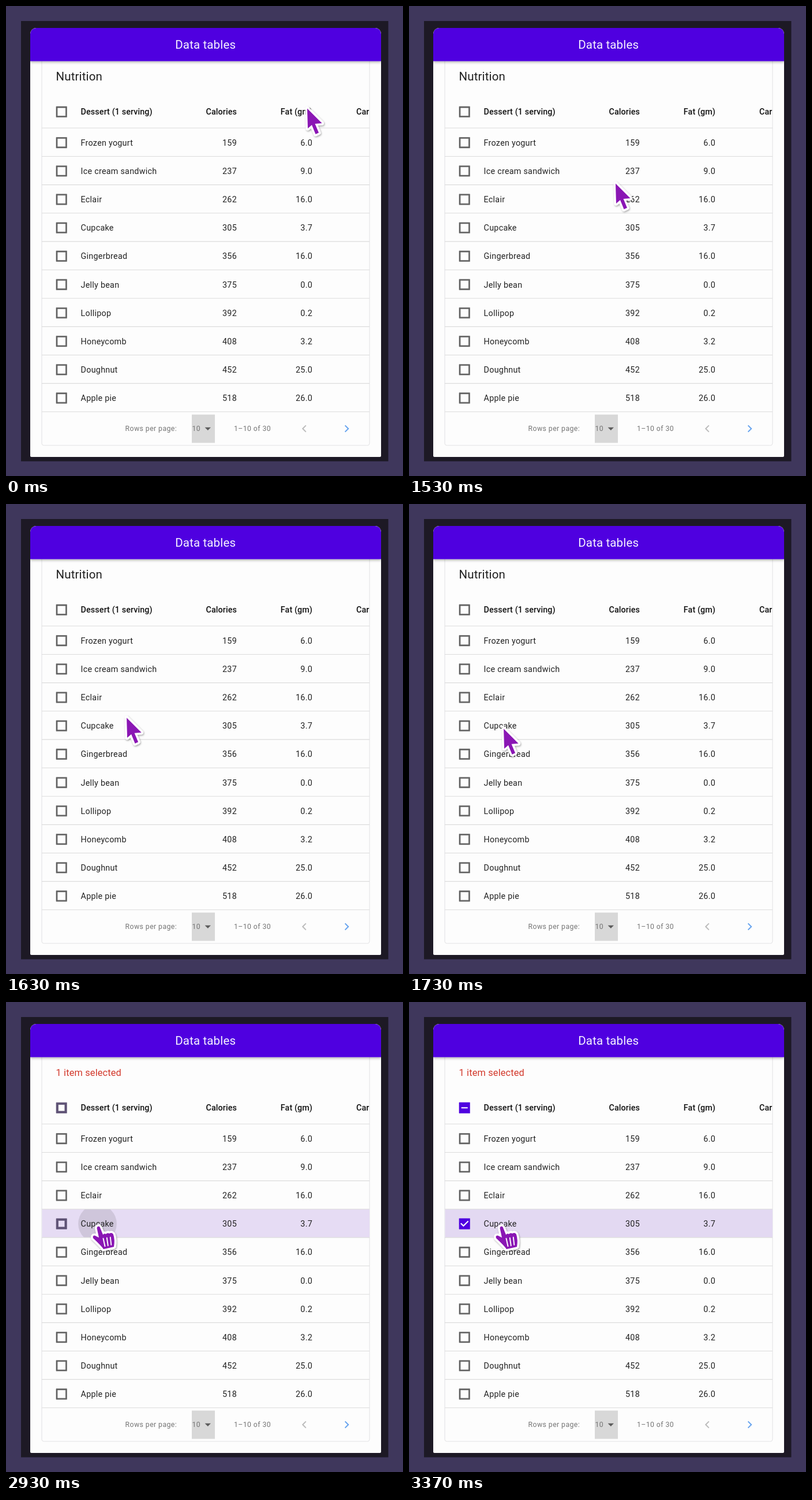
These frames come from a looping animation (688x814 px, 4.13 s). An HTML page:

```html
<!DOCTYPE html>
<html lang="en">
<head>
<meta charset="utf-8">
<title>Data tables</title>
<style>
  html, body { margin: 0; width: 100%; height: 100%; overflow: hidden; background: #3f375c; }
  svg { display: block; width: 688px; height: 814px; font-family: Roboto, sans-serif; }
  .title { font-size: 20.48px; letter-spacing: .15px; }
  .note { font-size: 16.38px; letter-spacing: .15px; fill: #d2382b; }
  .head { font-size: 14.34px; font-weight: 500; letter-spacing: .1px; fill: #111; }
  .cell { font-size: 14.34px; letter-spacing: .256px; fill: #222; }
  .foot { font-size: 12.29px; letter-spacing: .41px; fill: #757575; }
  .end { text-anchor: end; }
  .line { stroke: #dcdcdc; stroke-width: 1.1; }
  .mark { fill: none; stroke: #fff; stroke-width: 2.05; }
  .chevron { fill: none; stroke-width: 2; }
  .pointer { fill: #8a12b4; stroke: #fff; stroke-width: 7; stroke-linejoin: round; paint-order: stroke; filter: url(#shade); }
</style>
</head>
<body>
<svg viewBox="0 0 688 814">
  <defs>
    <filter id="shade" x="-40%" y="-40%" width="180%" height="180%">
      <feDropShadow dx="1" dy="1.5" stdDeviation="1.6" flood-opacity=".38"/>
    </filter>
    <filter id="barShade" x="-5%" y="-20%" width="110%" height="150%">
      <feDropShadow dx="0" dy="2" stdDeviation="2.2" flood-opacity=".3"/>
    </filter>
    <clipPath id="page"><path d="M42 48a10 10 0 0 1 10-10H640a10 10 0 0 1 10 10V779a2 2 0 0 1-2 2H44a2 2 0 0 1-2-2Z"/></clipPath>
    <clipPath id="card"><rect x="62" y="90" width="568" height="671"/></clipPath>
    <clipPath id="row"><rect x="62.5" y="358.9" width="567.5" height="49.1"/></clipPath>
  </defs>
  <rect width="688" height="814" fill="#3f375c"/>
  <rect x="26" y="26" width="636.5" height="762.5" fill="#1d1925"/>
  <g clip-path="url(#page)">
    <rect x="42" y="38" width="608" height="743" fill="#fdfdfd"/>
    <rect x="62" y="80" width="568" height="681" rx="4" fill="#fdfdfd" stroke="#e3e3e5" stroke-width="1.1"/>
    <g clip-path="url(#card)">
      <g id="selection">
        <rect id="tint" x="62.5" y="358.9" width="567.5" height="49.1"/>
        <circle id="splash" cx="158.5" cy="384" clip-path="url(#row)"/>
      </g>
      <g id="table"></g>
    </g>
    <text id="heading" class="title" x="86.5" y="129.3" fill="#212121">Nutrition</text>
    <text id="count" class="note" x="86.5" y="127.7">1 item selected</text>
    <rect x="322" y="707.6" width="40" height="49" fill="#d8d8d8"/>
    <path d="M344.6 729.8h10.4l-5.2 5.2z" fill="#5c5c5c"/>
    <g class="foot">
      <text x="206.6" y="736.3">Rows per page:</text>
      <text x="322.4" y="736.3">10</text>
      <text x="395" y="736.3">1–10 of 30</text>
    </g>
    <path class="chevron" stroke="#bcbcbc" d="M519.8 726.4l-5.6 5.6 5.6 5.6"/>
    <path class="chevron" stroke="#67a3ee" d="M587.6 726.4l5.6 5.6-5.6 5.6"/>
    <path filter="url(#barShade)" fill="#4f00e0" d="M42 95.5V48a10 10 0 0 1 10-10H640a10 10 0 0 1 10 10V95.5Z"/>
    <text class="title" x="345.7" y="74.2" text-anchor="middle" fill="#f6f2ff">Data tables</text>
  </g>
  <path id="arrow" class="pointer" d="M0 0L1 34.5 8 28.5 14.5 44.5 20 42 13.500 26.500 25.500 25.500Z"/>
  <g id="hand">
    <path class="pointer" d="M157.500 391.500Q158.500 387 162.500 389.500L168 403Q170.500 400 173 402Q176 399 179 401Q183.500 398.500 186 402.500Q189 412 187 424L169 428Q165 422 151 409Q149.500 404 154 404.500L161 408Z"/>
    <path d="M168.500 409.500l3 13.500M174.800 408.500l2 13.500M180.800 407.500l1.500 13" fill="none" stroke="#fff" stroke-width="1.9" stroke-linecap="round"/>
  </g>
</svg>
<script>
const LOOP = 4130, MOVE = 46, ARRIVE = 54, CLICK = 88, CHOSEN = 3;
const ROW_TOP = 211.3, ROW_HEIGHT = 49.15;
const BOX_X = 96.2, BOX_SIZE = 18.43, UNIT = 1.024;
const GREY = [97, 97, 97], ACTIVE = [79, 0, 224];
const desserts = [
  ['Frozen yogurt', 159, 6], ['Ice cream sandwich', 237, 9], ['Eclair', 262, 16],
  ['Cupcake', 305, 3.7], ['Gingerbread', 356, 16], ['Jelly bean', 375, 0],
  ['Lollipop', 392, .2], ['Honeycomb', 408, 3.2], ['Doughnut', 452, 25], ['Apple pie', 518, 26]
];
const byId = id => document.getElementById(id);
const table = byId('table');
const clamp = v => Math.min(1, Math.max(0, v));
const mix = (a, b, p) => a + (b - a) * p;
const blend = (a, b, p) => `rgb(${a.map((v, i) => Math.round(mix(v, b[i], p)))})`;
const show = (node, on) => node.setAttribute('visibility', on ? 'visible' : 'hidden');

function add(tag, attrs, text = '') {
  const node = document.createElementNS('http://www.w3.org/2000/svg', tag);
  for (const name in attrs) node.setAttribute(name, attrs[name]);
  node.textContent = text;
  return table.appendChild(node);
}

function addLine(y) {
  add('line', { class: 'line', x1: 62, x2: 630, y1: y, y2: y });
}

function addRow(y, kind, [name, calories, fat, carbs]) {
  const put = (x, text, align = '') => add('text', { class: `${kind} ${align}`, x, y: y + 5.1 }, text);
  put(129.6, name);
  put(400, calories, 'end');
  put(531, fat, 'end');
  if (carbs) put(607, carbs);
  return { y, frame: add('path', { 'fill-rule': 'evenodd' }), mark: add('path', { class: 'mark' }) };
}

function square(y, half) {
  return `M${BOX_X - half} ${y - half}h${2 * half}v${2 * half}h${-2 * half}Z`;
}

// The frame fills inwards during the first half, the mark draws in the second.
function drawBox({ y, frame, mark }, p, dash) {
  const half = BOX_SIZE / 2 - (1 - Math.abs(p - .5) * 2) * UNIT;
  const hole = half - 2 * UNIT - 2 * half * p * 2;
  frame.setAttribute('d', square(y, half) + (hole > 0 ? square(y, hole) : ''));
  const color = blend(GREY, ACTIVE, clamp(p * 4));
  for (const [name, value] of [['fill', color], ['stroke', color], ['stroke-width', .6], ['stroke-linejoin', 'round']])
    frame.setAttribute(name, value);
  const q = clamp(p * 2 - 1);
  const at = (x, v) => `${BOX_X + (x - .5) * BOX_SIZE} ${y + (v - .5) * BOX_SIZE}`;
  let d = '';
  if (q && dash) d = `M${at(.5 - .3 * q, .5)}L${at(.5 + .3 * q, .5)}`;
  else if (q) {
    const down = clamp(q * 2), up = clamp(q * 2 - 1);
    d = `M${at(.15, .45)}L${at(mix(.15, .4, down), mix(.45, .7, down))}`;
    if (up) d += `L${at(mix(.4, .85, up), mix(.7, .25, up))}`;
  }
  mark.setAttribute('d', d);
}

const header = addRow(183.3, 'head', ['Dessert (1 serving)', 'Calories', 'Fat (gm)', 'Carbs (gm)']);
const rows = desserts.map(([name, calories, fat], i) => {
  addLine(ROW_TOP + i * ROW_HEIGHT);
  return addRow(236.7 + i * ROW_HEIGHT, 'cell', [name, calories, fat.toFixed(1)]);
});
addLine(ROW_TOP + desserts.length * ROW_HEIGHT);
rows.forEach(row => drawBox(row, 0));

function render(time) {
  // Thirty pictures a second, each starting on a whole hundredth.
  const rest = time % 100;
  const tick = 3 * Math.floor(time / 100) + (rest >= 70 ? 2 : rest >= 30 ? 1 : 0);
  const selected = tick >= CLICK;

  const left = (1 - clamp((tick - MOVE) / (ARRIVE - MOVE))) ** 3;
  const [x, y] = tick < MOVE ? [522, 177.5] : [161 + 197 * left, 390.5 - 83 * left];
  byId('arrow').setAttribute('transform', `translate(${x} ${y})`);

  show(byId('arrow'), !selected);
  show(byId('hand'), selected);
  show(byId('heading'), !selected);
  show(byId('count'), selected);
  show(byId('selection'), selected);

  const elapsed = selected ? (tick - CLICK + 1) * 100 / 3 : 0;
  const progress = clamp(elapsed / 200);
  byId('tint').setAttribute('fill', blend([230, 221, 244], [227, 217, 242], progress));
  byId('splash').setAttribute('r', elapsed);
  byId('splash').setAttribute('fill-opacity', .12 * (1 - progress));
  drawBox(header, progress ** 1.8, true);
  drawBox(rows[CHOSEN], progress ** 1.8);
}

const start = performance.now();
function play() {
  render((performance.now() - start) % LOOP);
  requestAnimationFrame(play);
}
play();
</script>
</body>
</html>
```
